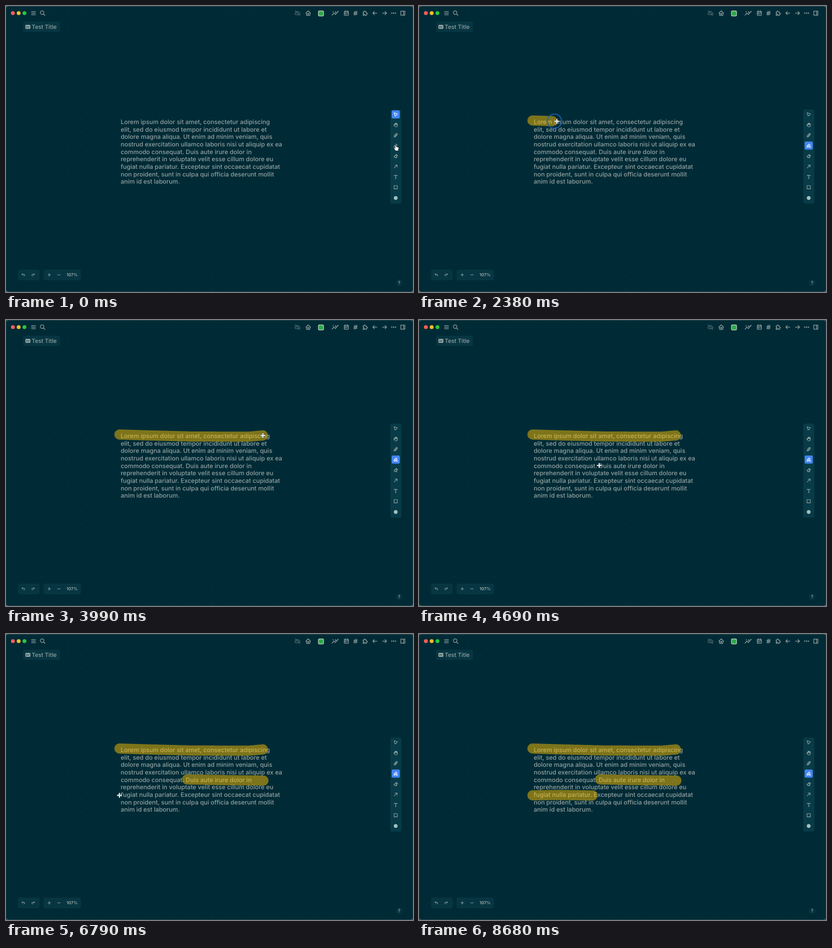
Recreate the animation shown at these times as an HTML page with a canvas. Size 800 by 562 pixels, loop 8.75 s.

```html
<!DOCTYPE html>
<html lang="en">
<head>
<meta charset="utf-8">
<title>Whiteboard highlighter</title>
<style>
html, body { margin: 0; width: 100%; height: 100%; overflow: hidden; background: #002b36; }
canvas { display: block; width: 800px; height: 562px; }
</style>
</head>
<body>
<canvas id="stage"></canvas>
<script>
const W = 800, H = 562, LOOP = 8750, STEP = 70;
const BG = '#002b36', PANEL = '#073642', INK = '#93a1a1', BLUE = '#4285f4';
const FONT = 'Inter, "Liberation Sans", sans-serif';

const canvas = document.getElementById('stage');
const ctx = canvas.getContext('2d');
const dpr = window.devicePixelRatio || 1;
canvas.width = W * dpr;
canvas.height = H * dpr;
ctx.textRendering = 'geometricPrecision';

const LINES = [
  'Lorem ipsum dolor sit amet, consectetur adipiscing',
  'elit, sed do eiusmod tempor incididunt ut labore et',
  'dolore magna aliqua. Ut enim ad minim veniam, quis',
  'nostrud exercitation ullamco laboris nisi ut aliquip ex ea',
  'commodo consequat. Duis aute irure dolor in',
  'reprehenderit in voluptate velit esse cillum dolore eu',
  'fugiat nulla pariatur. Excepteur sint occaecat cupidatat',
  'non proident, sunt in culpa qui officia deserunt mollit',
  'anim id est laborum.'
];

// Icons on a 24-unit box
const ICONS = {
  menu: 'M4 6h16M4 12h16M4 18h16',
  search: 'M3 10a7 7 0 1 0 14 0a7 7 0 1 0-14 0M21 21l-6-6',
  cloudOff: 'M9.6 5.2A7 7 0 0 1 17.5 10h1a3.5 3.5 0 0 1 2.2 6.2M18 18H6.7a4.5 4.5 0 0 1 0-9M3 3l18 18',
  home: 'M5 12H3l9-9 9 9h-2M5 12v7a2 2 0 0 0 2 2h10a2 2 0 0 0 2-2v-7M10 13h4v4h-4z',
  graph: 'M0 20l7-8 6 5L24 5M6 12h2v1H6zM12 17h2v-1h-2zM22 5h2v1h-2zM4 5v3M14 6v4M12 8h4',
  calendar: 'M4 5h16v15H4zM16 2v5M8 2v5M4 11h16M8 15h3',
  hash: 'M5 9h14M5 15h14M11 4L7 20M17 4l-4 16',
  puzzle: 'M4 7h3a1 1 0 0 0 1-1V5a2 2 0 0 1 4 0v1a1 1 0 0 0 1 1h3a1 1 0 0 1 1 1v3a1 1 0 0 0 1 1h1a2 2 0 0 1 0 4h-1a1 1 0 0 0-1 1v3a1 1 0 0 1-1 1h-3a1 1 0 0 1-1-1v-1a2 2 0 0 0-4 0v1a1 1 0 0 1-1 1H4v-5h1a2 2 0 0 0 0-4H4z',
  left: 'M4 12h16M4 12l6 6M4 12l6-6',
  right: 'M4 12h16M20 12l-6 6M20 12l-6-6',
  panel: 'M4 4h16v16H4zM15 4v16',
  select: 'M4 4l5 16 4-3 5-4 2-4z',
  hand: 'M8 13V6a1.5 1.5 0 0 1 3 0v5M11 5a1.5 1.5 0 0 1 3 0v6M14 6a1.5 1.5 0 0 1 3 0v6M17 8a1.5 1.5 0 0 1 3 0v8a6 6 0 0 1-6 6h-2a6 6 0 0 1-5-3l-4-5.5a1.5 1.5 0 0 1 2.5-1.7L8 14',
  pencil: 'M4 21l1-7L14 4q4-2 6 1 1 3-1 5l-9 10zM9 17l7-9',
  marker: 'M3 20l2-7L14 4l5 5-9 10zM9 12l4 4M15 20h7M18 15v5',
  eraser: 'M19 20H8.5l-5-5L15 4l6 6-10 10M18 13l-6.3-6.3',
  arrow: 'M5 19L19 5M9 5h10v10',
  text: 'M5 7V5h14v2M12 5v15M10 20h4',
  square: 'M4 4h16v16H4z',
  undo: 'M9 14l-4-4 4-4M5 10h10a4 4 0 0 1 0 8h-1',
  redo: 'M15 14l4-4-4-4M19 10H9a4 4 0 0 0 0 8h1',
  plus: 'M12 5v14M5 12h14',
  minus: 'M5 12h14'
};
for (const k in ICONS) ICONS[k] = new Path2D(ICONS[k]);

const TOP_BAR = [
  ['menu', 54], ['search', 72], ['home', 594], ['graph', 647], ['calendar', 669],
  ['hash', 687], ['puzzle', 706], ['left', 725], ['right', 744], ['panel', 780]
];
const TOOLS = ['select', 'hand', 'pencil', 'marker', 'eraser', 'arrow', 'text', 'square'];

// Pointer track: time, x, y, eased when 1
const TRACK = [
  [0, 767, 278], [420, 767, 278], [1120, 240, 236, 1], [1260, 239, 236], [1680, 223, 225, 1],
  [1980, 223, 225], [2380, 271, 226.5], [2900, 365, 229], [3430, 477, 229.3], [3640, 505, 226.8],
  [3990, 505, 227], [4550, 351, 286, 1], [4760, 356, 285.8], [5200, 420, 287],
  [5740, 506, 288], [5950, 506, 288], [6580, 223, 317, 1], [6930, 223, 317],
  [7400, 275, 316.3], [8050, 341, 317.3], [8190, 341, 317], [8610, 480, 590, 1]
];
const STROKES = [[1980, 3640], [4760, 5740], [6930, 8050]];
const PICK = 280, LAG = 75;

function pointer(t) {
  let a = TRACK[0];
  for (const b of TRACK) {
    if (t <= b[0]) {
      let u = b[0] > a[0] ? (t - a[0]) / (b[0] - a[0]) : 0;
      if (b[3]) u = u * u * (3 - 2 * u);
      return [a[1] + (b[1] - a[1]) * u, a[2] + (b[2] - a[2]) * u];
    }
    a = b;
  }
  return [a[1], a[2]];
}

function box(x, y, w, h, r, fill) {
  ctx.beginPath();
  ctx.roundRect(x, y, w, h, r);
  ctx.fillStyle = fill;
  ctx.fill();
}

function disc(x, y, r, fill) {
  ctx.beginPath();
  ctx.arc(x, y, r, 0, Math.PI * 2);
  ctx.fillStyle = fill;
  ctx.fill();
}

function icon(name, x, y, size, color = INK, weight = 2.5) {
  ctx.save();
  ctx.translate(x - size / 2, y - size / 2);
  ctx.scale(size / 24, size / 24);
  ctx.strokeStyle = color;
  ctx.lineWidth = weight;
  ctx.lineCap = ctx.lineJoin = 'round';
  ctx.stroke(ICONS[name]);
  ctx.restore();
}

function label(text, x, y, size, weight = 500, color = INK) {
  ctx.font = `${weight} ${size}px ${FONT}`;
  ctx.fillStyle = color;
  ctx.fillText(text, x, y);
}

function drawBoard() {
  ctx.fillStyle = '#3b555d';
  ctx.fillRect(0, 0, W, H);
  box(0.2, 0.8, W - 0.4, H - 1.6, 5, BG);
  ctx.fillStyle = 'rgba(147,161,161,.24)';
  for (let y = 16; y < H - 4; y += 25.7)
    for (let x = 19; x < W - 4; x += 25.7) ctx.fillRect(x - 0.5, y - 0.5, 1, 1);
}

function drawHeader() {
  ['#ff5f57', '#febc2e', '#28c840'].forEach((c, i) => disc(13.5 + i * 11.4, 14, 3.8, c));
  for (const [name, x] of TOP_BAR) icon(name, x, 14, 12);
  icon('cloudOff', 573, 14, 12, '#526a70');
  for (let i = -1; i < 2; i++) disc(762 + i * 3.6, 14, 1.2, INK);
  box(613.5, 9, 11.3, 11.3, 2.5, '#c3d5c6');
  box(614.7, 10.2, 8.9, 8.9, 1.5, '#2fa84a');

  box(34, 31, 72, 20, 3, PANEL);
  box(38, 37, 10, 8, 2, INK);
  ctx.strokeStyle = PANEL;
  ctx.lineWidth = 1;
  ctx.beginPath();
  ctx.moveTo(40, 42.5);
  ctx.quadraticCurveTo(41, 38, 42.5, 41);
  ctx.quadraticCurveTo(43.5, 44, 46, 40);
  ctx.stroke();
  label('Test Title', 50.5, 45, 11.2);
}

function drawText() {
  LINES.forEach((s, i) => label(s, 225.4, 232.1 + i * 14.63, 12.02));
}

function drawStrokes(t) {
  ctx.strokeStyle = 'rgba(250,190,0,.5)';
  ctx.lineWidth = 20;
  ctx.lineCap = ctx.lineJoin = 'round';
  for (const [start, end] of STROKES) {
    const last = Math.min(t - LAG, end);
    if (last < start) continue;
    ctx.beginPath();
    ctx.moveTo(...pointer(start));
    for (let s = start + 35; s < last; s += 35) ctx.lineTo(...pointer(s));
    ctx.lineTo(...pointer(last));
    ctx.stroke();
  }
}

function drawTools(t) {
  box(755.5, 203.5, 21.5, 185, 4, '#083b47');
  const active = t < PICK ? 0 : 3;
  TOOLS.forEach((name, i) => {
    const y = 213 + i * 20.45, on = i === active;
    if (on) box(758, y - 8, 16, 16, 2.5, BLUE);
    icon(name, 766, y, 9.6, on ? '#fff' : INK, 2.8);
  });
  disc(766, 377.3, 3.7, '#a5c0c0');
}

function drawFooter() {
  box(24, 518, 42, 21, 3, PANEL);
  box(74, 518, 73, 21, 3, PANEL);
  icon('undo', 34, 528, 9, INK, 2.8);
  icon('redo', 53.5, 528, 9, INK, 2.8);
  icon('plus', 85, 528.3, 9, INK, 3);
  icon('minus', 104, 528.3, 9, INK, 3);
  label('107%', 119, 531.3, 8.2, 600, '#a3b0b0');
  disc(772.8, 544, 7, '#06323d');
  label('?', 770.3, 547.3, 9, 600);
}

function drawHand(x, y) {
  const p = new Path2D('M-3-5q1-1.5 2 0l1 3.5 4 .8q1.5.5 1 2.500l-.8 4q-.5 1-2 1h-2q-1.5 0-2.500-1.5l-2.500-4q-.5-1.5 1-1l1.5 1z');
  ctx.save();
  ctx.translate(x, y);
  ctx.fillStyle = '#fff';
  ctx.strokeStyle = '#12232a';
  ctx.lineWidth = 1;
  ctx.fill(p);
  ctx.stroke(p);
  ctx.restore();
}

function drawCross(x, y) {
  ctx.lineCap = 'butt';
  for (const [color, width, arm] of [['rgba(20,40,46,.55)', 3.8, 5.3], ['#e4e9e9', 2.4, 4.7]]) {
    ctx.strokeStyle = color;
    ctx.lineWidth = width;
    ctx.beginPath();
    ctx.moveTo(x - arm, y);
    ctx.lineTo(x + arm, y);
    ctx.moveTo(x, y - arm);
    ctx.lineTo(x, y + arm);
    ctx.stroke();
  }
}

function drawPointer(t) {
  const [x, y] = pointer(t);
  const pressed = (t >= 210 && t < 350) || STROKES.some(([a, b]) => t >= a && t <= b + 40);
  if (pressed) {
    const [cx, cy] = pointer(t - 40);
    ctx.beginPath();
    ctx.arc(cx, cy, 14, 0, Math.PI * 2);
    ctx.strokeStyle = 'rgba(28,96,176,.8)';
    ctx.lineWidth = 2.4;
    ctx.stroke();
  }
  if (x > 755) drawHand(x, y);
  else drawCross(x, y);
}

function frame(now) {
  const t = Math.floor((now % LOOP) / STEP) * STEP;
  ctx.setTransform(dpr, 0, 0, dpr, 0, 0);
  drawBoard();
  drawText();
  drawStrokes(t);
  drawHeader();
  drawTools(t);
  drawFooter();
  drawPointer(t);
}

const begin = performance.now();
function tick() {
  frame(performance.now() - begin);
  requestAnimationFrame(tick);
}
tick();
</script>
</body>
</html>
```
